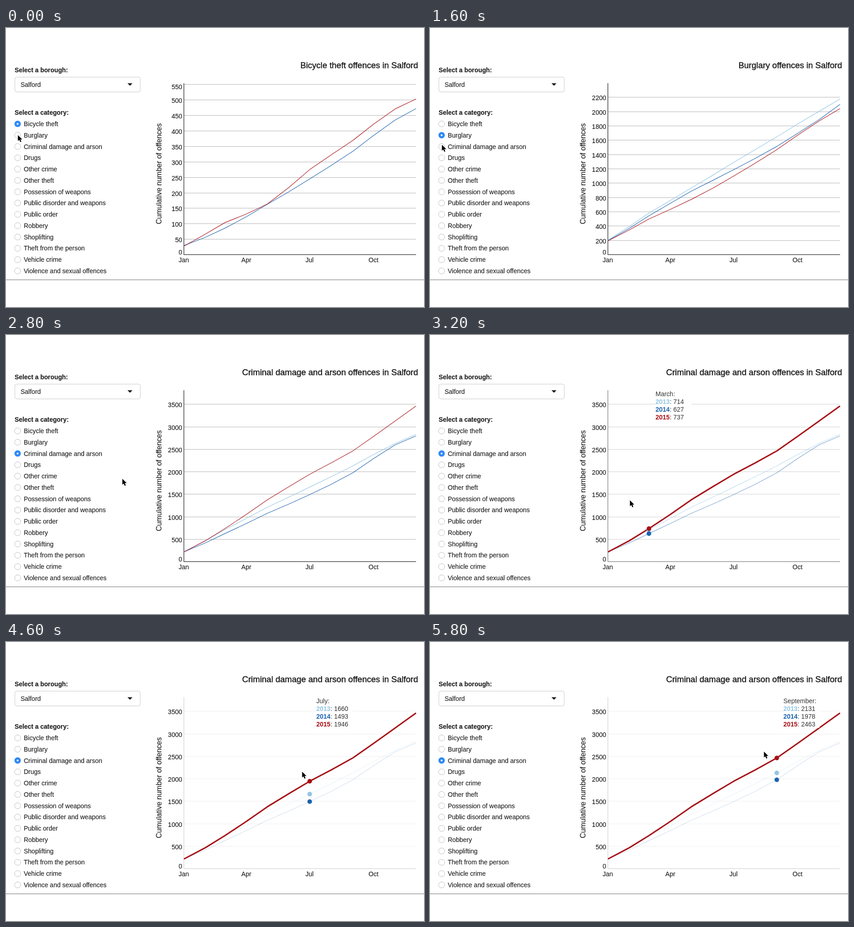
Animation of 917 by 611 pixels, one loop 5.9 s. Source, as an HTML page:

```html
<!DOCTYPE html>
<html lang="en">
<head>
<meta charset="utf-8">
<title>Recorded offences</title>
<style>
html, body { margin: 0; width: 100%; height: 100%; overflow: hidden; background: #fff; }
svg { display: block; width: 917px; height: 611px; font: 14px "Liberation Sans", Arial, sans-serif; fill: #1c1c1c; }
text { stroke: #1c1c1c; stroke-width: .12px; }
.heading { font-weight: bold; font-size: 13.85px; }
.title { font-size: 18.55px; text-anchor: end; stroke-width: .45px; }
.tick { text-anchor: end; }
.month { text-anchor: middle; }
.grid { stroke: #b4b4b4; }
.axis { fill: none; stroke: #2b2b2b; stroke-width: 1.3; }
.line { fill: none; stroke-linejoin: round; }
.tip { fill: #333; stroke: none; }
.year { font-weight: bold; }
</style>
</head>
<body>
<svg viewBox="0 0 917 611">
  <text class="heading" x="19" y="97">Select a borough:</text>
  <rect x="19.5" y="107.5" width="275" height="32.5" rx="4" fill="#fff" stroke="#c8c8c8"/>
  <text x="32" y="129">Salford</text>
  <path d="M266.5 121h11l-5.5 5.5z"/>
  <text class="heading" x="19" y="190">Select a category:</text>
  <g id="radios"></g>
  <path d="M0 551.5H917" stroke="#6a6a6a"/>
  <text transform="translate(341 429.7) rotate(-90)" font-size="16">Cumulative number of offences</text>
  <g id="chart"></g>
  <g id="cursor">
    <path transform="translate(.6 1) scale(.92)" d="M0 0V14.2L3.3 11.2L5.6 16.6L8.2 15.5L5.9 10.3H10.4Z"
      fill="#000" stroke="#fff" paint-order="stroke"/>
  </g>
</svg>
<script>
const LOOP = 5900, STEP = 100;
const BASE = 496.7, HEIGHT = 375.4, LEFT = 390.3, RIGHT = 899.5;
const COLORS = ["#92c5e3", "#1b62b0", "#a60f15"];
const FIRST_YEAR = 2013;
const MONTHS = ["January", "February", "March", "April", "May", "June", "July",
  "August", "September", "October", "November", "December"];
const CATEGORIES = ["Bicycle theft", "Burglary", "Criminal damage and arson", "Drugs",
  "Other crime", "Other theft", "Possession of weapons", "Public disorder and weapons",
  "Public order", "Robbery", "Shoplifting", "Theft from the person", "Vehicle crime",
  "Violence and sexual offences"];

// Totals for every second month, then December; a short series starts late.
const CHARTS = [
  [[36, 113, 216, 295, 316],
   [30, 86, 163, 245, 334, 435, 472],
   [28, 104, 164, 275, 369, 471, 503]],
  [[206, 583, 934, 1291, 1648, 2005, 2177],
   [197, 545, 889, 1189, 1514, 1890, 2101],
   [194, 500, 774, 1100, 1469, 1871, 2043]],
  [[225, 714, 1212, 1660, 2131, 2630, 2833],
   [220, 627, 1077, 1493, 1978, 2600, 2797],
   [218, 737, 1378, 1946, 2463, 3130, 3463]]
].map(makeChart);
const SWITCHES = [0, 500, 1900];
const HOVER_START = 3000, FADE = 400, FADED = .2;

// Cursor key points: time, x, y.
const PATH = [[500, 25.5, 233.5], [1000, 25.5, 254.5], [2300, 25.5, 255],
  [3200, 438, 361], [3700, 538, 336.5], [4600, 649, 283], [5800, 732, 239]];

const $ = id => document.getElementById(id);
const clamp = (v, lo, hi) => Math.min(hi, Math.max(lo, v));
const monthX = MONTHS.map((_, m) =>
  LEFT + (RIGHT - LEFT) * (Date.UTC(2015, m) - Date.UTC(2015, 0)) / 864e5 / 334);
const text = (cls, x, y, s) => `<text class="${cls}" x="${x}" y="${y}">${s}</text>`;

// Fills the months between the given totals with a smooth curve.
function monthly(keys) {
  const n = keys.length, dec = keys[n - 1];
  const even = [...keys.slice(0, -1), 2 * dec - keys[n - 2]];
  const at = i => i < 0 ? 2 * even[0] - even[1] : even[i];
  const values = Array(14 - 2 * n);
  for (let i = 0; i < n - 2; i++)
    values.push(at(i), (9 * (at(i) + at(i + 1)) - at(i - 1) - at(i + 2)) / 16);
  return [...values, at(n - 2), dec];
}

// The axis ends 10% above the highest total, with about ten round steps.
function makeChart(series) {
  const max = 1.1 * Math.max(...series.flat());
  const unit = 10 ** Math.floor(Math.log10(max / 10));
  const r = max / 10 / unit;
  const gap = unit * (r >= 50 ** .5 ? 10 : r >= 10 ** .5 ? 5 : r >= 2 ** .5 ? 2 : 1);
  return { data: series.map(monthly), max, gap, y: v => BASE - HEIGHT * v / max };
}

function cursorAt(t) {
  const i = clamp(PATH.findIndex(p => p[0] >= t), 1, PATH.length - 1);
  const [t0, x0, y0] = PATH[i - 1], [t1, x1, y1] = PATH[i];
  const p = clamp((t - t0) / (t1 - t0), 0, 1);
  return [x0 + (x1 - x0) * p, y0 + (y1 - y0) * p];
}

function radios(selected) {
  return CATEGORIES.map((name, i) => {
    const y = 210 + i * 24.77;
    const dot = i === selected
      ? `<circle cx="25.5" cy="${y}" r="7" fill="#2f8af8"/><circle cx="25.5" cy="${y}" r="2" fill="#fff"/>`
      : `<circle cx="25.5" cy="${y}" r="6.6" fill="#fff" stroke="#bdbdbd"/>`;
    return dot + text("", 39, y + 5, name);
  }).join("");
}

function tooltip({ data, y }, m) {
  const x = monthX[m] + 14.5;
  const dots = data.map((d, i) =>
    `<circle cx="${monthX[m]}" cy="${y(d[m])}" r="5" fill="${COLORS[i]}"/>`).join("");
  const rows = data.map((d, i) => text("tip", x, 151 + i * 17,
    `<tspan class="year" fill="${COLORS[i]}">${FIRST_YEAR + i}</tspan>: ${Math.round(d[m])}`)).join("");
  return `${dots}<rect x="${x}" y="120" width="79" height="68" fill="#fff"/>`
    + text("tip", x, 134, MONTHS[m] + ":") + rows;
}

function drawChart(index, month, fade) {
  const chart = CHARTS[index], { data, max, gap, y } = chart;
  const hover = month >= 0;
  let grid = "", labels = "";
  for (let v = 0; v <= max; v += gap) {
    if (v) grid += `<path class="grid" d="M${LEFT} ${Math.floor(y(v)) + .5}H${RIGHT}"/>`;
    labels += text("tick", 386.5, clamp(y(v) + 6.5, 134, 496), v);
  }
  for (let m = 0; m < 12; m += 3)
    labels += text("month", monthX[m] - .3, 513, MONTHS[m].slice(0, 3));
  const lines = data.map((d, i) => {
    const points = [];
    d.forEach((v, m) => points.push(`${monthX[m]},${y(v)}`));
    const strong = hover && i === 2;
    return `<polyline class="line" points="${points.join(" ")}" stroke="${COLORS[i]}"
      stroke-width="${strong ? 3 : 1.2}" opacity="${strong ? 1 : .9 * fade}"/>`;
  }).join("");
  return text("title", 904, 88, `${CATEGORIES[index]} offences in Salford`)
    + `<g opacity="${fade}">${grid}<path class="axis" d="M${LEFT} 121V496.4H${RIGHT}"/></g>`
    + labels + lines + (hover ? tooltip(chart, month) : "");
}

function draw(t) {
  const [x, y] = cursorAt(t);
  const index = SWITCHES.filter(s => t >= s).length - 1;
  const month = x > LEFT ? monthX.findIndex(mx => mx >= x) : -1;
  const p = clamp((t - HOVER_START) / FADE, 0, 1);
  $("radios").innerHTML = radios(index);
  $("chart").innerHTML = drawChart(index, month, 1 - (1 - FADED) * p);
  $("cursor").setAttribute("transform", `translate(${x} ${y})`);
}

const start = performance.now();
let last = -1;
function tick(now) {
  const t = Math.floor(Math.max(0, now - start) % LOOP / STEP) * STEP;
  if (t !== last) draw(last = t);
  requestAnimationFrame(tick);
}
tick(start);
</script>
</body>
</html>
```
